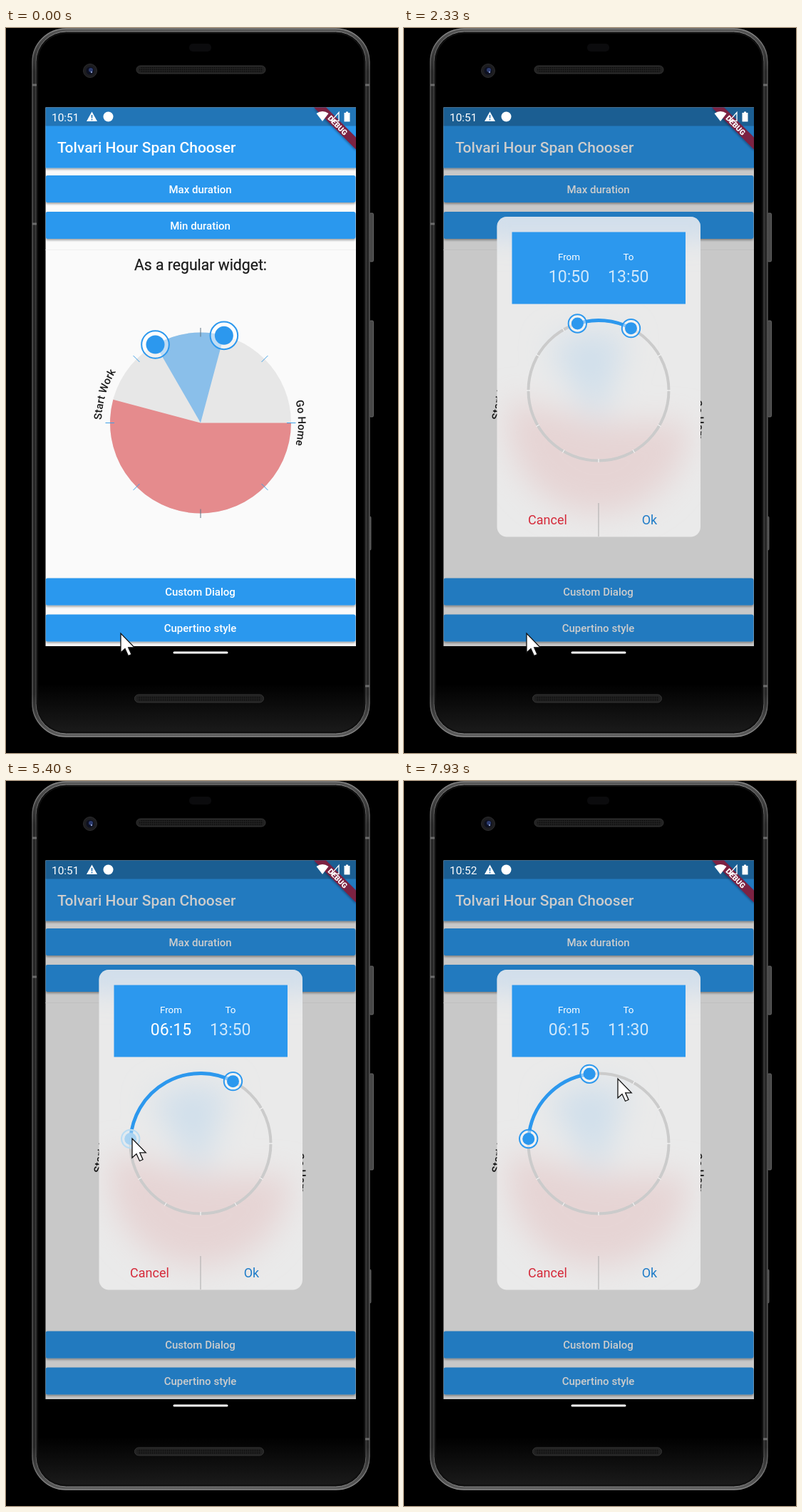
Recreate the animation shown at these times as an HTML page. Size 550 by 1018 pixels, loop 8 s.

```html
<!DOCTYPE html>
<html lang="en">
<head>
<meta charset="utf-8">
<title>Range picker</title>
<style>
html, body { margin: 0; width: 100%; height: 100%; overflow: hidden; background: #000; }
svg { display: block; width: 550px; height: 1018px; font-family: Roboto, sans-serif; }
.mid { text-anchor: middle; }
.med { font-weight: 500; }
</style>
</head>
<body>
<svg id="stage" viewBox="0 0 550 1018" xmlns="http://www.w3.org/2000/svg"></svg>
<script>
const LOOP = 8000, STEP = 200 / 3;
const BLUE = '#2c98ee';
const stage = document.getElementById('stage');

// Angles are clockwise degrees from twelve o'clock.
const polar = (cx, cy, r, deg) => {
  const a = deg * Math.PI / 180;
  return [cx + r * Math.sin(a), cy - r * Math.cos(a)];
};
const at = p => p.map(v => v.toFixed(2)).join(' ');
const arc = (cx, cy, r, a, b) =>
  `M${at(polar(cx, cy, r, a))}A${r} ${r} 0 ${b - a > 180 ? 1 : 0} 1 ${at(polar(cx, cy, r, b))}`;
const sector = (cx, cy, r, a, b, fill) =>
  `<path d="${arc(cx, cy, r, a, b)}L${cx} ${cy}Z" fill="${fill}"/>`;
const ticks = (cx, cy, r1, r2, count, paint) => Array.from({ length: count }, (_, i) => {
  const deg = i * 360 / count;
  return `<path d="M${at(polar(cx, cy, r1, deg))}L${at(polar(cx, cy, r2, deg))}" stroke="${paint(deg)}"/>`;
}).join('');
const text = (x, y, size, str, attrs = '') =>
  `<text x="${x}" y="${y}" font-size="${size}" ${attrs}>${str}</text>`;
const rect = (x, y, w, h, fill, attrs = '') =>
  `<rect x="${x}" y="${y}" width="${w}" height="${h}" fill="${fill}" ${attrs}/>`;
const button = (y, label, inner = '') =>
  rect(55.5, y, 435, 38, BLUE, 'rx="3" filter="url(#drop)"') + inner +
  text(272.5, y + 24.5, 15, label, 'class="mid med" fill="#fff"');
const knob = (id, r, ring, [x, y] = [0, 0]) =>
  `<g id="${id}" transform="translate(${x} ${y})">
    <circle r="${ring}" fill="#fff" fill-opacity=".45" stroke="${BLUE}" stroke-width="2"/>
    <circle r="${r}" fill="${BLUE}"/></g>`;
const speaker = (x, y) =>
  rect(x, y, 181, 11, '#222', 'rx="5.5" stroke="#343434"') +
  rect(x + 4, y + 2, 173, 7, 'url(#mesh)', 'rx="3"');
const fade = (id, ...stops) => `<linearGradient id="${id}" x2="0" y2="1">` +
  stops.map(([o, c]) => `<stop offset="${o}" stop-color="${c}"/>`).join('') + '</linearGradient>';

const PIE = [273, 554.5, 127], DIAL = [273, 509];

const defs = `<defs>
  <filter id="drop" x="-5%" y="-20%" width="110%" height="160%">
    <feDropShadow dx="0" dy="2" stdDeviation="1.4" flood-opacity=".36"/></filter>
  <filter id="soft" x="-30%" y="-30%" width="160%" height="160%"><feGaussianBlur stdDeviation="22"/></filter>
  <pattern id="mesh" width="3" height="3" patternUnits="userSpaceOnUse">
    <circle cx="1.5" cy="1.5" r="1" fill="#0c0c0c"/></pattern>
  ${fade('edge', [0, '#8a8a8a'], [.06, '#505050'], [.94, '#505050'], [1, '#8a8a8a'])}
  ${fade('band', [0, '#555'], [.06, '#272727'], [.94, '#272727'], [1, '#5c5c5c'])}
  ${fade('glass', [0, '#000'], [.93, '#000'], [1, '#1b1b1b'])}
  <clipPath id="screen"><rect x="55.5" y="111.5" width="435.5" height="756.5"/></clipPath>
  <clipPath id="press"><rect x="55.5" y="823.5" width="435" height="38" rx="3"/></clipPath>
  <clipPath id="sheet"><rect x="130.5" y="265" width="285.5" height="449.5" rx="14"/></clipPath>
  <path id="curveL" d="${arc(...PIE.slice(0, 2), 139, 246.5, 326.5)}"/>
  <path id="curveR" d="${arc(...PIE.slice(0, 2), 137, 50, 130)}"/>
</defs>`;

const phone = `
  <rect width="550" height="1018"/>
  ${[[260, 68], [411, 135], [686, 47]].map(([y, h], i) =>
    rect(510, y, i < 2 ? 5.5 : 2, h, '#484848', 'rx="1.5" stroke="#747474" stroke-width=".8"')).join('')}
  ${rect(37, 1, 473, 994, 'url(#band)', 'rx="47" stroke="url(#edge)" stroke-width="1.6"')}
  ${rect(43.5, 6.5, 460, 983, 'url(#glass)', 'rx="41" stroke="#101010" stroke-width="3"')}
  ${rect(42, 5, 463, 986, 'none', 'rx="42.5" stroke="url(#edge)" stroke-width="1"')}
  <path d="M37 80h6M504 80h6M37 275h6M504 924h6" stroke="#6c6c6c" stroke-width="3"/>
  ${rect(257, 22, 31, 11, '#0b0b0d', 'rx="5"')}
  <circle cx="118" cy="60" r="9.5" fill="#1d1d20" stroke="#2c2c2e"/>
  <circle cx="118" cy="60" r="5.5" fill="#0d1020"/>
  <circle cx="119" cy="59" r="3" fill="#2c3c70"/><circle cx="120" cy="62" r="1.2" fill="#8d9ccc"/>
  ${speaker(183, 53)}${speaker(180.5, 936)}`;

const page = `
  ${rect(55, 111, 436, 757, '#fafafa')}
  ${rect(55, 137, 436, 59.5, BLUE, 'filter="url(#drop)"')}
  ${rect(55, 111, 436, 26.5, '#2275b6')}
  ${text(72, 175, 21, 'Tolvari Hour Span Chooser', 'class="med" fill="#fff"')}
  ${button(207, 'Max duration')}${button(258, 'Min duration')}
  <path d="M55 311.5H491" stroke="#f0f0f0"/>
  ${text(273, 339.5, 21.2, 'As a regular widget:', 'class="mid" fill="#1c1c1c" stroke="#1c1c1c" stroke-width=".25"')}
  <circle cx="${PIE[0]}" cy="${PIE[1]}" r="127" fill="#e7e7e7"/>
  ${sector(...PIE, 90, 285, '#e58b8d')}${sector(...PIE, -30, 15, '#8abfea')}
  ${ticks(...PIE.slice(0, 2), 121, 133.5, 8, d => d % 180 ? '#3f9fe6' : '#5f7484')}
  ${knob('pieA', 13, 19.3, polar(...PIE, -30))}${knob('pieB', 13, 19.3, polar(...PIE, 15))}
  <g class="mid med" font-size="15" fill="#1c1c1c">
    <text><textPath href="#curveL" startOffset="50%">Start Work</textPath></text>
    <text><textPath href="#curveR" startOffset="50%">Go Home</textPath></text>
  </g>
  ${button(772.5, 'Custom Dialog')}
  ${button(823.5, 'Cupertino style', '<g clip-path="url(#press)"><circle id="ripple" cy="842" fill="#fff"/></g>')}
  <rect id="shade" x="55" y="111" width="436" height="757" opacity="0"/>`;

const dialog = `<g id="dialog">
  <g clip-path="url(#sheet)">
    ${rect(130, 264, 287, 452, '#eaeaea')}
    <g filter="url(#soft)">
      ${rect(100, 250, 350, 40, '#c6d9ec')}
      ${sector(...PIE, 90, 285, '#e6d4d4')}${sector(...PIE, -33, 18, '#d0dfeb')}
    </g>
  </g>
  ${rect(151.5, 286.5, 243.5, 101, BLUE)}
  <g class="mid" fill="#fff">
    ${text(231.5, 326, 13.4, 'From')}${text(315, 326, 13.4, 'To')}
    ${text(231.5, 356.5, 23, '', 'id="fromText"')}${text(314.7, 356.5, 23, '', 'id="toText"')}
  </g>
  <circle cx="273" cy="509" r="98.5" fill="none" stroke="#cbcbcb" stroke-width="4"/>
  ${ticks(...DIAL, 96, 101, 12, () => '#fff')}
  <path id="span" fill="none" stroke="${BLUE}" stroke-width="4.8"/>
  ${knob('from', 8.5, 12.7)}${knob('to', 8.5, 12.7)}
  <path d="M273 667V714" stroke="#ababab"/>
  ${text(201.5, 697, 18, 'Cancel', 'class="mid" fill="#d52a3a"')}
  ${text(344.5, 697, 18, 'Ok', 'class="mid" fill="#1f7cc8"')}
</g>`;

const overlay = `
  <path d="M432 111.5H449L491 153.5V170.5Z" fill="#7b2143" filter="url(#drop)"/>
  <text transform="translate(465.5 136.5) rotate(45)" y="4" class="mid" font-size="10.6" font-weight="800" fill="#fff">DEBUG</text>
  ${text(64, 130.5, 15.4, '', 'id="clock" fill="#fff"')}
  <path d="M120.5 117.5L128 131H113Z" fill="#fff"/>
  <path d="M120.5 122v4.5m0 1.2v1.8" stroke="#2275b6" stroke-width="1.6"/>
  <circle cx="143.5" cy="124.5" r="7" fill="#fff"/>
  <path d="M435.5 120Q444 114 452.5 120L444 131Z" fill="#fff"/>
  <path d="M456.5 130.5H467V118.5Z" fill="none" stroke="#fff" stroke-width="1.3"/>
  <path d="M474.5 119H477V117.5H480V119H482.5V131.5H474.5Z" fill="#fff"/>
  ${rect(234.5, 875.5, 77, 3, '#fff', 'rx="1.5"')}
  <path id="cursor" d="M0 0V27L6 21.5L10.5 31.5L15 29.5L10.7 19.8H19.2Z" fill="#fff" stroke="#111" stroke-width="1.3"/>`;

stage.innerHTML = defs + phone + `<g clip-path="url(#screen)">${page}</g>` + dialog + overlay;

const el = Object.fromEntries([...stage.querySelectorAll('[id]')].map(n => [n.id, n]));
const set = (id, attrs) => { for (const k in attrs) el[id].setAttribute(k, attrs[k]); };
const clamp = v => Math.min(1, Math.max(0, v));
const ratio = (t, a, b) => clamp((t - a) / (b - a));
const smooth = p => p * p * (3 - 2 * p);
const mix = (a, b, p) => a + (b - a) * p;

// Pointer stops: time, x, y. The drags below replace the straight way.
const stops = [
  [0, 161, 850], [300, 161, 850], [1000, 183, 842], [1300, 183, 842], [1800, 172, 850],
  [3200, 172, 850], [3900, 243, 416], [4050, 243, 416], [5200, 177, 502], [5500, 177, 502],
  [6000, 319, 422], [6130, 319, 422], [6850, 261, 405], [7100, 261, 405], [7700, 300, 418], [LOOP, 300, 418]
];
// Start, end, release, minutes before and after, pointer offset at the end.
const drags = {
  from: { a: 4050, b: 5200, up: 5500, m0: 650, m1: 375, dx: 2, dy: -1 },
  to: { a: 6130, b: 6850, up: 7050, m0: 830, m1: 690, dx: 1, dy: -7 }
};
const toDeg = m => (m - 720) / 4;
const label = m => [Math.floor(m / 60), m % 60].map(v => String(v).padStart(2, '0')).join(':');

function pointer(t) {
  for (const d of Object.values(drags)) {
    if (t > d.a && t < d.b) {
      const p = smooth(ratio(t, d.a, d.b));
      const [x, y] = polar(...DIAL, 98, toDeg(mix(d.m0, d.m1, p)));
      return [x + d.dx * p, y + d.dy * p];
    }
  }
  const i = stops.findIndex(s => s[0] > t);
  const [t0, x0, y0] = stops[i - 1], [t1, x1, y1] = stops[i];
  const p = smooth(ratio(t, t0, t1));
  return [mix(x0, x1, p), mix(y0, y1, p)];
}

function draw(t) {
  const open = ratio(t, 2045, 2295);
  const scale = 1 + .3 * (1 - open) ** 4.3;
  set('shade', { opacity: .2 * (1 - (1 - open) ** 2) });
  set('dialog', {
    opacity: open,
    transform: `translate(273 490) scale(${scale}) translate(-273 -490)`
  });

  const grow = ratio(t, 1930, 2200);
  set('ripple', {
    cx: mix(178, 266, grow), r: mix(30, 228, grow),
    opacity: .22 * ratio(t, 1920, 1990) * (1 - ratio(t, 2130, 2330))
  });

  const minutes = {};
  for (const id in drags) {
    const d = drags[id], held = t >= d.a && t < d.up;
    const m = Math.round(mix(d.m0, d.m1, smooth(ratio(t, d.a, d.b))) / 5) * 5;
    minutes[id] = m;
    const [ring, dot] = el[id].children;
    set(id, { transform: `translate(${at(polar(...DIAL, 98.5, toDeg(m)))})` });
    ring.setAttribute('stroke', held ? '#b9dcf3' : BLUE);
    ring.setAttribute('fill', held ? '#d8ecf8' : '#fff');
    dot.setAttribute('fill', held ? '#a9d3f2' : BLUE);
    el[id + 'Text'].textContent = label(m);
    set(id + 'Text', { 'fill-opacity': held ? 1 : .78 });
  }
  set('span', { d: arc(...DIAL, 98.5, toDeg(minutes.from), toDeg(minutes.to)) });

  el.clock.textContent = t < 7400 ? '10:51' : '10:52';
  set('cursor', { transform: `translate(${at(pointer(t))})` });
}

function tick() {
  const t = performance.now() % LOOP;
  draw(Math.floor((t + 7) / STEP) % 120 * STEP);
  requestAnimationFrame(tick);
}
tick();
</script>
</body>
</html>
```
